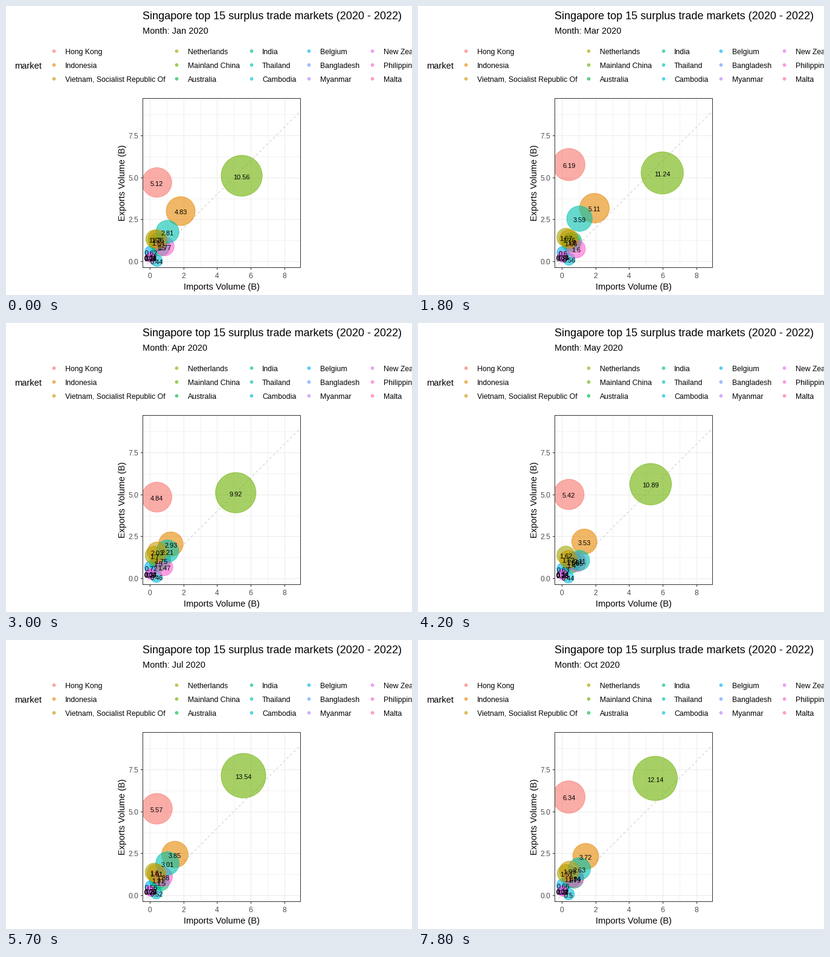
Animation of 672 by 480 pixels, one loop 8000 ms. Source, as a matplotlib script:

```python
import numpy as np
import matplotlib.pyplot as plt
from matplotlib.animation import FuncAnimation
from matplotlib.patches import Circle, Rectangle

plt.rcParams["font.family"] = "Liberation Sans"

W, H, DPI = 672, 480, 72  # at 72 dpi one point is one pixel
X0, Y0, UNIT = 238, 424, 27.85
LEFT, RIGHT, TOP, BOTTOM = 226.5, 487.5, 153.5, 434.5

MONTHS = "Jan Feb Mar Apr May Jun Jul Aug Sep Oct Nov".split()
MONTH_DAYS = np.cumsum([0, 31, 29, 31, 30, 31, 30, 31, 31, 30, 31])
DAYS_PER_STEP = 1065 / 99  # 100 steps span January 2020 to December 2022
MONTH_STEPS = np.round(MONTH_DAYS / DAYS_PER_STEP)

# color, typical imports and typical total volume in billions
MARKETS = {
    "Hong Kong": ("#F8766D", .42, 5.6),
    "Indonesia": ("#E58700", 1.5, 4),
    "Vietnam, Socialist Republic Of": ("#C99800", .42, 1.8),
    "Netherlands": ("#A3A500", .27, 1.5),
    "Mainland China": ("#6BB100", 5.5, 11.5),
    "Australia": ("#00BA38", .5, 1.45),
    "India": ("#00BF7D", .65, 1.6),
    "Thailand": ("#00C0AF", 1.05, 2.7),
    "Cambodia": ("#00BCD8", .4, .5),
    "Belgium": ("#00B0F6", .08, .65),
    "Bangladesh": ("#619CFF", .05, .3),
    "Myanmar": ("#B983FF", .05, .3),
    "New Zealand": ("#E76BF3", .05, .3),
    "Philippines": ("#FD61D1", .8, 1.65),
    "Malta": ("#FF67A4", .05, .3),
}

# monthly totals of the largest markets; February lies between its neighbours
KEY_MONTHS = [0, *range(2, 11)]
TOTALS = {
    "Hong Kong": [5.12, 6.19, 6.1, 4.84, 5.42, 5.6, 5.57, 6.07, 6.34, 6.16],
    "Indonesia": [4.83, 5.11, 4.01, 2.93, 3.53, 4.09, 3.85, 4, 3.72, 3.81],
    "Mainland China": [10.56, 11.24, 10.79, 9.92, 10.89, 11.02, 13.54, 12.04, 12.14, 13.28],
    "Thailand": [2.81, 3.59, 3.59, 2.21, 2.11, 2.83, 3.01, 2.49, 2.63, 2.63],
}
CHINA_IMPORTS = [5.46, 5.97, 5.2, 5.06, 5.28, 5.5, 5.6, 5.48, 5.54, 5.57]


def monthly(values):
    return np.interp(range(len(MONTHS)), KEY_MONTHS, values)


def build_tracks():
    """Monthly imports and totals per market, in drawing order."""
    rng = np.random.default_rng(4)
    tracks = {}
    for name in sorted(MARKETS):
        _, imports, total = MARKETS[name]
        wobble = rng.uniform(-.15, .15, (2, len(MONTHS)))
        if name in TOTALS:
            totals = monthly(TOTALS[name])
            imports = np.full(len(MONTHS), imports)
        else:
            totals = total * (1 + wobble[0])
            imports = imports * (1 + wobble[1])
        tracks[name] = imports, totals
    tracks["Mainland China"] = monthly(CHINA_IMPORTS), tracks["Mainland China"][1]
    tracks["Indonesia"] = .38 * tracks["Indonesia"][1], tracks["Indonesia"][1]
    return tracks


def px(x):
    return X0 + UNIT * x


def py(y):
    return Y0 - UNIT * y


def crisp(v):
    return round(v) + .5


fig = plt.figure(figsize=(W / DPI, H / DPI), dpi=DPI, facecolor="white")
ax = fig.add_axes([0, 0, 1, 1])
ax.set(xlim=(0, W), ylim=(H, 0))
ax.axis("off")


def line(xs, ys, color, width=1, **kw):
    return ax.plot(xs, ys, color=color, lw=width, solid_capstyle="butt",
                   snap=False, **kw)[0]


def text(x, y, s, size, color="black", **kw):
    return ax.text(x, y, s, fontsize=size, color=color, **kw)


def draw_panel():
    for x in range(9):
        gx = crisp(px(x))
        line([gx, gx], [TOP, BOTTOM], "#EBEBEB", .6 if x % 2 else 1, zorder=0)
        if x % 2 == 0:
            line([gx, gx], [BOTTOM, BOTTOM + 3.5], "#333333")
            text(px(x), 452, str(x), 12, "#4D4D4D", ha="center")
    for i in range(8):
        y = 1.25 * i
        gy = crisp(py(y))
        line([LEFT, RIGHT], [gy, gy], "#EBEBEB", .6 if i % 2 else 1, zorder=0)
        if i % 2 == 0:
            line([LEFT - 3.5, LEFT], [gy, gy], "#333333")
            text(219, py(y) + 4.8, f"{y:.1f}", 12, "#4D4D4D", ha="right")
    frame = Rectangle((LEFT, TOP), RIGHT - LEFT, BOTTOM - TOP,
                      fill=False, ec="#333333", lw=1, snap=False, zorder=5)
    ax.add_patch(frame)
    ends = np.array([-1, 10])
    diagonal = line(px(ends), py(ends), "#BEBEBE", .8, zorder=1, dashes=(5, 5))
    diagonal.set_clip_path(frame)
    text(356.5, 471, "Imports Volume (B)", 14.67, ha="center")
    text(193, 294, "Exports Volume (B)", 14.67, rotation=90, ha="center", va="center")
    return frame


def draw_legend():
    text(14.5, 104, "market", 14.67)
    columns = [(79.5, 98), (282.5, 301), (406.5, 424), (501.5, 520), (606.5, 625)]
    for i, (name, (color, *_)) in enumerate(MARKETS.items()):
        dot_x, text_x = columns[i // 3]
        y = 75 + 23 * (i % 3)
        ax.add_patch(Circle((dot_x, y), 2.3, fc=color, ec=color, lw=1, alpha=.6))
        text(text_x, y + 5, name, 12.2)


text(226, 22, "Singapore top 15 surplus trade markets (2020 - 2022)", 17.95)
subtitle = text(226, 46, "", 14.5)
panel = draw_panel()
draw_legend()

tracks = build_tracks()
bubbles, labels = {}, {}
for name in tracks:
    color = MARKETS[name][0]
    bubbles[name] = ax.add_patch(Circle((0, 0), 1, fc=color, ec=color,
                                        lw=1, alpha=.6, zorder=2))
    labels[name] = text(0, 0, "", 11, ha="center", zorder=3)
    for artist in (bubbles[name], labels[name]):
        artist.set_clip_path(panel)


def update(frame):
    step = frame // 3
    month = np.searchsorted(MONTH_DAYS, step * DAYS_PER_STEP, side="right") - 1
    nearest = np.argmin(abs(MONTH_STEPS - step))
    subtitle.set_text(f"Month: {MONTHS[month]} 2020")
    for name, (imports, totals) in tracks.items():
        x = np.interp(step, MONTH_STEPS, imports)
        total = np.interp(step, MONTH_STEPS, totals)
        center = px(x), py(total - x)
        bubbles[name].set_center(center)
        bubbles[name].set_radius(3 + 9.55 * np.sqrt(total))
        labels[name].set_position((center[0], center[1] + 5.7))
        labels[name].set_text(f"{round(totals[nearest], 2):g}")
    return [subtitle, *bubbles.values(), *labels.values()]


anim = FuncAnimation(fig, update, frames=80, interval=100, repeat=True, repeat_delay=0)
plt.show()
```
